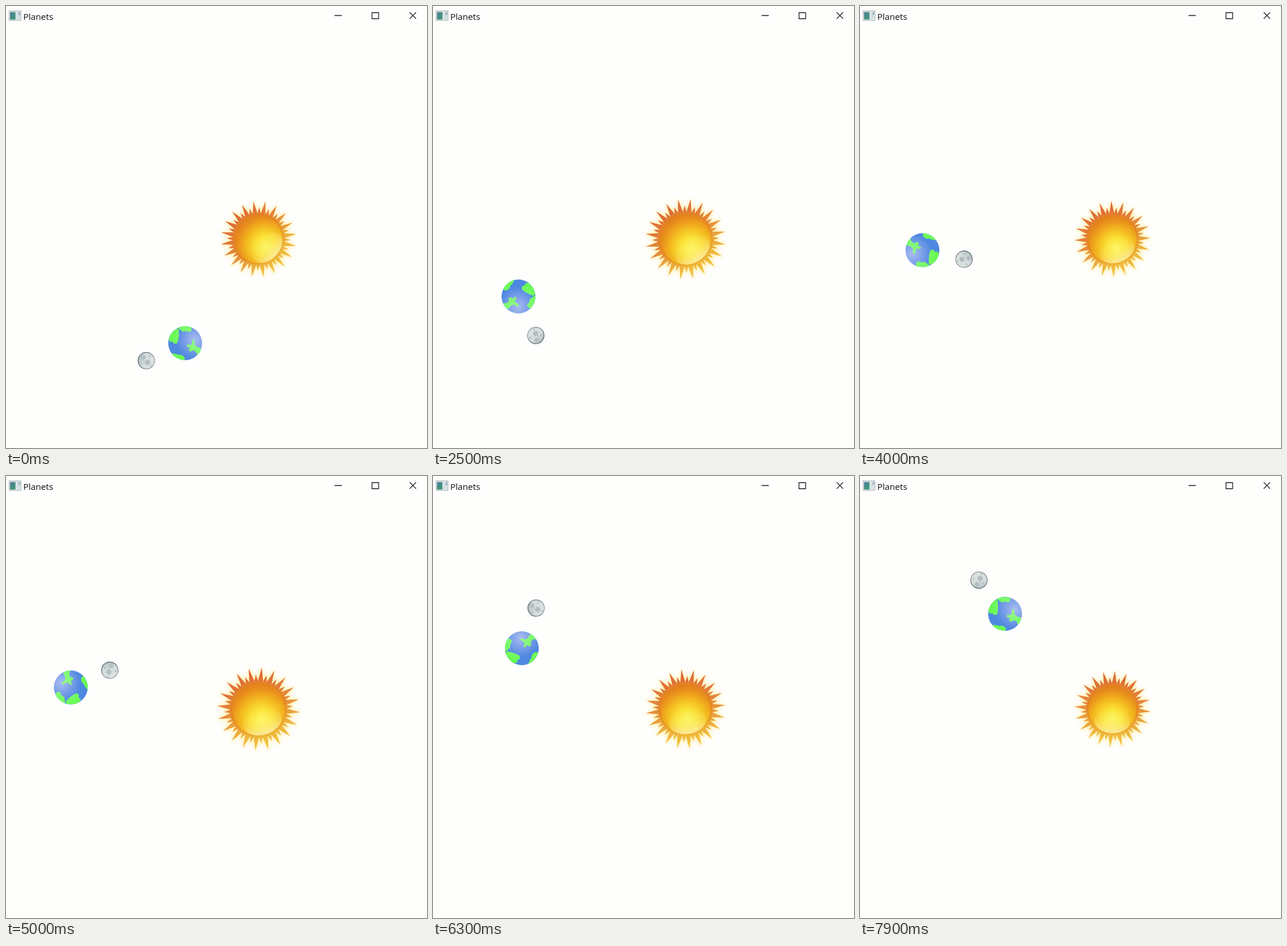
An HTML page for the animation above (8000 ms loop, 731 px wide and 766 px high).

```html
<!DOCTYPE html>
<html lang="en">
<head>
<meta charset="utf-8">
<title>Planets</title>
<style>
  html, body { margin: 0; width: 100%; height: 100%; overflow: hidden; background: #fefefc; }
  svg { display: block; width: 731px; height: 766px; }
  text { font: 15.2px "Open Sans", "Noto Sans", sans-serif; fill: #111; }
</style>
</head>
<body>
<svg viewBox="0 0 731 766">
  <defs>
    <linearGradient id="rayFill" gradientUnits="userSpaceOnUse" x1="0" y1="-65" x2="0" y2="65">
      <stop offset="0" stop-color="#dd6434"/>
      <stop offset=".45" stop-color="#e58a3c"/>
      <stop offset=".75" stop-color="#edb03e"/>
      <stop offset="1" stop-color="#f3c63c"/>
    </linearGradient>
    <linearGradient id="rimFill" x1="0" y1="0" x2="0" y2="1">
      <stop offset="0" stop-color="#e2812c"/>
      <stop offset=".5" stop-color="#e4861c"/>
      <stop offset="1" stop-color="#eeb534"/>
    </linearGradient>
    <radialGradient id="sunFill" gradientUnits="userSpaceOnUse" cx="0" cy="17" r="59">
      <stop offset="0" stop-color="#fdf65c"/>
      <stop offset=".3" stop-color="#fae134"/>
      <stop offset=".58" stop-color="#f3b71f"/>
      <stop offset=".82" stop-color="#e98f1c"/>
      <stop offset="1" stop-color="#e17d1c"/>
    </radialGradient>
    <linearGradient id="shine" x1="0" y1="0" x2="0" y2="1">
      <stop offset="0" stop-color="#fff8b0" stop-opacity="0"/>
      <stop offset=".5" stop-color="#fff6a0" stop-opacity=".2"/>
      <stop offset="1" stop-color="#fff3cc" stop-opacity=".7"/>
    </linearGradient>
    <filter id="glow" filterUnits="userSpaceOnUse" x="-85" y="-85" width="170" height="170">
      <feGaussianBlur stdDeviation="3.2"/>
    </filter>
    <radialGradient id="seaFill" gradientUnits="userSpaceOnUse" cx="17" cy="-6" r="34">
      <stop offset="0" stop-color="#a9bdf1"/>
      <stop offset=".5" stop-color="#7ea0e8"/>
      <stop offset="1" stop-color="#4f88e0"/>
    </radialGradient>
    <radialGradient id="landFill" gradientUnits="userSpaceOnUse" cx="17" cy="-6" r="42">
      <stop offset="0" stop-color="#96f78e"/>
      <stop offset="1" stop-color="#68fb52"/>
    </radialGradient>
    <clipPath id="globe"><circle r="29.4"/></clipPath>
    <linearGradient id="moonFill" x1="0" y1=".4" x2="1" y2=".6">
      <stop offset="0" stop-color="#b3bfc2"/>
      <stop offset=".35" stop-color="#d3dbdb"/>
      <stop offset="1" stop-color="#dde3e2"/>
    </linearGradient>
    <linearGradient id="moonEdge" x1="0" y1=".4" x2="1" y2=".6">
      <stop offset="0" stop-color="#4c5b61"/>
      <stop offset="1" stop-color="#8b979a"/>
    </linearGradient>
    <linearGradient id="pane" x1="0" y1="0" x2="1" y2="1">
      <stop offset="0" stop-color="#4d7f9c"/>
      <stop offset="1" stop-color="#3f9a6c"/>
    </linearGradient>
  </defs>

  <g>
    <rect x="5.5" y="8.5" width="20.5" height="16.5" fill="#e9eeef" stroke="#a3acb0"/>
    <rect x="7" y="10.5" width="9.5" height="13" fill="url(#pane)"/>
    <rect x="18" y="10.5" width="6.5" height="13" fill="#d3e0e4"/>
    <rect x="22" y="10.5" width="2.5" height="5" fill="#8eabb8"/>
    <text x="30" y="24">Planets</text>
    <path d="M570.5 16.5H583M635.5 11.5h11.5v10.5h-11.5zM701 11l11 11M712 11l-11 11" fill="none" stroke="#1a1a1a" stroke-width="1.3"/>
  </g>

  <g id="sun">
    <g filter="url(#glow)" opacity=".6">
      <path class="rays" fill="#ffe36a" stroke="#ffe36a" stroke-width="2"/>
      <circle r="48" fill="#ffe36a"/>
    </g>
    <path class="rays" fill="url(#rayFill)"/>
    <circle r="44.7" fill="url(#rimFill)"/>
    <circle r="41.6" fill="url(#sunFill)"/>
    <ellipse cy="21" rx="31" ry="20.5" fill="url(#shine)"/>
  </g>

  <g id="earth">
    <circle r="29.4" fill="url(#seaFill)"/>
    <g clip-path="url(#globe)" fill="url(#landFill)">
      <path d="M-29-8L-25-17-16-25-11-24-11-14-12-6-14 0-19 1-22-3-26-2z"/>
      <path d="M-14-27L0-31 11-29 11-23 8-19 2-21-4-20-8-23z"/>
      <path d="M-28 17L-18 18-12 20-6 20-1 24-1 30-14 31z"/>
      <path d="M14-8L17-3 16 2 20 6 26 8 29 12 26 19 21 21 19 15 14 12 9 15 6 11 8 8 2 5 4 2 10 3 12-2z"/>
    </g>
  </g>

  <g id="moon">
    <circle r="14.3" fill="url(#moonFill)" stroke="url(#moonEdge)" stroke-width="1.2"/>
    <g fill="#b2bebf">
      <circle cx="2" cy="3" r="4.5"/>
      <circle cx="-5.5" cy="-6" r="4"/>
      <circle cx="6" cy="-8" r="1.6"/>
      <circle cx="-8" cy="5" r="1.7"/>
      <circle cx="-4" cy="1" r="1.3"/>
      <circle cx="8" cy="8" r="1.5"/>
    </g>
  </g>
</svg>
<script>
  const LOOP = 8000, STEP = 100;
  const RAD = Math.PI / 180;
  const [sun, earth, moon] = ["sun", "earth", "moon"].map(id => document.getElementById(id));

  // Angles are measured clockwise from the top.
  const polar = (r, deg) =>
    `${(r * Math.sin(deg * RAD)).toFixed(2)} ${(-r * Math.cos(deg * RAD)).toFixed(2)}`;
  const spike = (deg, tip, spread) =>
    `M${polar(43, deg - spread)}L${polar(tip, deg)}L${polar(43, deg + spread)}z`;

  let rays = "";
  for (let i = 0; i < 20; i++) {
    const deg = 3 + 18 * i;
    rays += spike(deg + 9, 55, 4.5) + spike(deg, 66, 6);
  }
  document.querySelectorAll(".rays").forEach(p => p.setAttribute("d", rays));

  const easeBoth = u =>
    u < .2 ? 3.125 * u * u :
    u > .8 ? 1 - 3.125 * (1 - u) * (1 - u) :
    1.25 * u - .125;

  const place = (el, x, y, turn, scale = 1) =>
    el.setAttribute("transform", `translate(${x} ${y}) rotate(${turn}) scale(${scale})`);

  function draw(s) {
    const beat = (s / 1.95 % 1) * 2;
    const pulse = easeBoth(beat < 1 ? beat : 2 - beat);
    place(sun, 438.5, 404, 6 * s - 46.7, 1 + .1 * pulse);

    const phase = .3081 * s - 1.336;
    const x = 373 - 266 * Math.cos(phase);
    const y = 404 - 185.5 * Math.sin(phase);
    place(earth, x, y, 45 * s);

    const orbit = (155.8 - 35.9 * s) * RAD;
    place(moon, x + 73.9 * Math.cos(orbit), y + 73.9 * Math.sin(orbit), -60 * s);
  }

  const start = performance.now();
  function tick() {
    const t = (performance.now() - start) % LOOP;
    draw(Math.floor(t / STEP) * STEP / 1000);
    requestAnimationFrame(tick);
  }
  tick();
</script>
</body>
</html>
```
